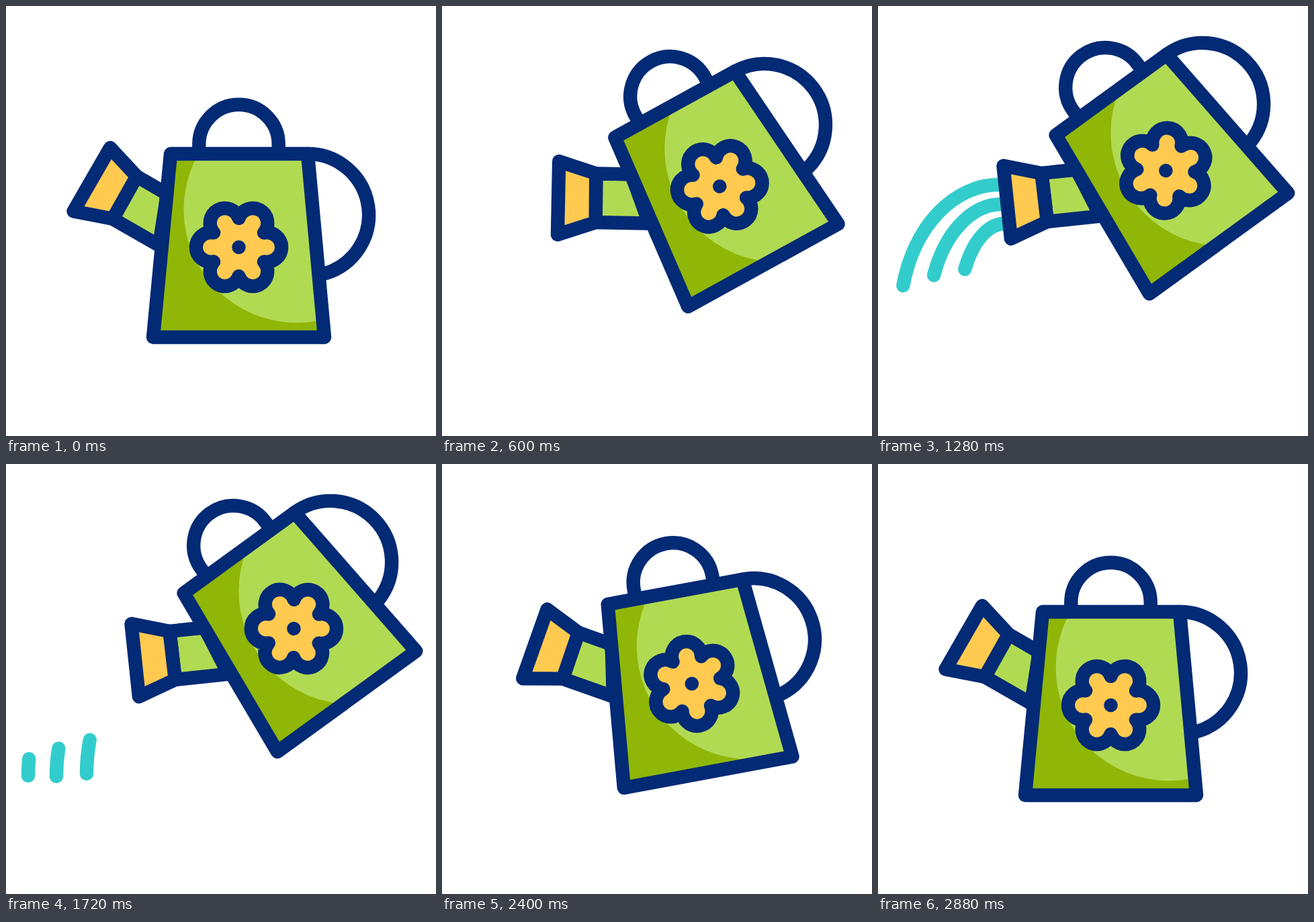
Recreate the animation shown at these times as an HTML page. Size 640 by 640 pixels, loop 3000 ms.

```html
<!DOCTYPE html>
<html lang="en">
<head>
<meta charset="utf-8">
<title>Watering can</title>
<style>
  html, body { margin: 0; width: 100%; height: 100%; overflow: hidden; background: #fff; }
  svg { display: block; width: 100vw; height: 100vh; }
  .line { fill: none; stroke: #032a75; stroke-width: 20.4; stroke-linecap: round; stroke-linejoin: round; }
  .light { fill: #b1da53; }
  .dark { fill: #90b607; }
  .yellow { fill: #ffca4f; }
  .water { fill: none; stroke: #33cccc; stroke-width: 20.4; stroke-linecap: round; }
</style>
</head>
<body>
<svg viewBox="0 0 640 640">
  <defs>
    <clipPath id="bodyClip"><path d="M245 220H449L474 493H219Z"/></clipPath>
  </defs>
  <g id="streams"></g>
  <g id="can">
    <path class="line" d="M287.3 220V206A59.2 59.2 0 0 1 405.7 206V220"/>
    <path class="line" d="M449 220A91 91 0 0 1 474 398.5"/>
    <path class="line light" d="M194.5 253.5L240 279.8L228 356.5L159 316.8Z"/>
    <path id="rose" class="line yellow"/>
    <g clip-path="url(#bodyClip)">
      <rect class="dark" x="200" y="200" width="300" height="310"/>
      <circle id="shine" class="light" cx="86.5" cy="-56" r="168.5"/>
    </g>
    <path class="line" d="M245 220H449L474 493H219Z"/>
    <g id="flower">
      <path id="petals" class="line yellow"/>
      <circle r="10.3" fill="#032a75"/>
    </g>
  </g>
</svg>
<script>
const LOOP = 3000;
const byId = id => document.getElementById(id);
const can = byId('can'), rose = byId('rose'), shine = byId('shine'), flower = byId('flower');

// Smooth ease from 0 to 1 between two times.
function ease(t, start, end) {
  const u = Math.min(1, Math.max(0, (t - start) / (end - start)));
  return u * u * (3 - 2 * u);
}

// Six arcs that meet in notches halfway between the petals.
function petalPath(notch, radius) {
  let d = '';
  for (let i = 0; i <= 6; i++) {
    const a = (i * 60 - 30) * Math.PI / 180;
    const point = `${notch * Math.cos(a)} ${notch * Math.sin(a)}`;
    d += i ? `A${radius} ${radius} 0 1 1 ${point}` : `M${point}`;
  }
  return d + 'Z';
}
byId('petals').setAttribute('d', petalPath(43.2, 22));

// Each stream is a quarter ellipse: leaves sideways, ends straight down.
const streams = [
  [180, 266, 33, 464],
  [184, 295, 75, 465],
  [188, 324, 120, 461]
].map(([x, y, endX, endY], i) => {
  const path = document.createElementNS('http://www.w3.org/2000/svg', 'path');
  path.setAttribute('class', 'water');
  path.setAttribute('d', `M${x} ${y}A${x - endX} ${endY - y} 0 0 0 ${endX} ${endY}`);
  byId('streams').append(path);
  return { path, length: path.getTotalLength(), start: 915 + i * 45 };
});

function render(t) {
  const tilt = ease(t, 197, 763) - ease(t, 2037, 2603);
  can.setAttribute('transform',
    `translate(${320 + 64 * tilt} ${320 - 91 * tilt}) rotate(${-36 * tilt}) translate(-320 -320)`);

  // The shine stays upright while the can tilts.
  shine.setAttribute('transform', `translate(346.5 359) rotate(${36 * tilt})`);

  const spin = 360 * ease(t, 200, 2880);
  flower.setAttribute('transform', `translate(346.5 359) rotate(${spin})`);

  const squash = t > 780 && t < 1100 ? 5 * Math.sin((t - 780) / 320 * Math.PI) ** 2 : 0;
  const dx = squash * 0.876, dy = squash * 0.483;
  rose.setAttribute('d',
    `M${155 + dx} ${211 + dy}L194.5 253.5L159 316.8L${100.5 + dx} ${305.5 + dy}Z`);

  for (const { path, length, start } of streams) {
    const head = length * ease(t, start, start + 500);
    const tail = length * ease(t, start + 400, start + 900);
    const visible = head - tail > 0.05;
    path.style.display = visible ? '' : 'none';
    path.setAttribute('stroke-dasharray', `${head - tail} ${length * 2}`);
    path.setAttribute('stroke-dashoffset', -tail);
  }
}

const origin = performance.now();
function tick() {
  render((performance.now() - origin) % LOOP);
  requestAnimationFrame(tick);
}
tick();
</script>
</body>
</html>
```
